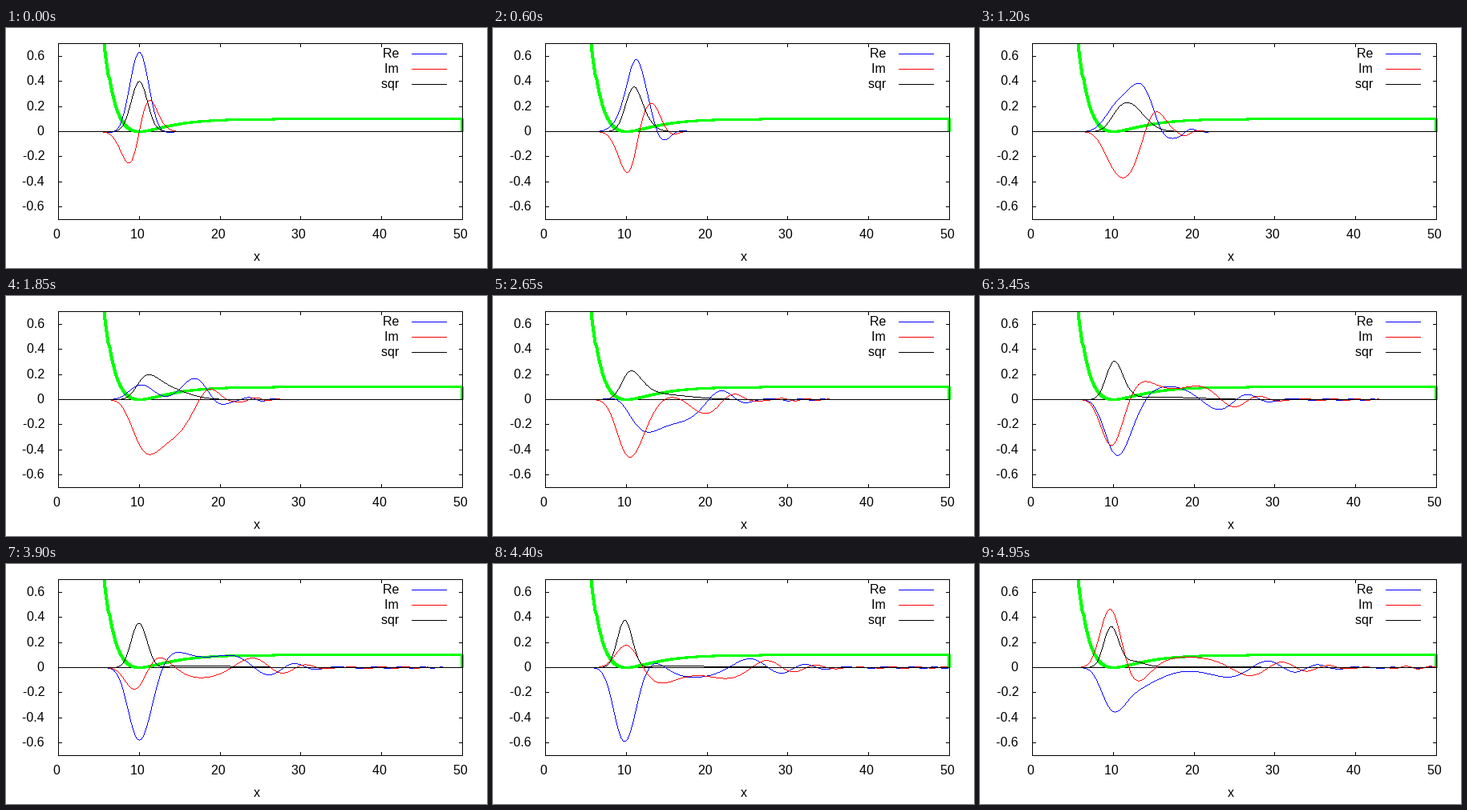
A matplotlib script for the animation above (5000 ms loop, 600 by 300 pixels).

```python
import numpy as np
import matplotlib
import matplotlib.pyplot as plt
from matplotlib.animation import FuncAnimation

matplotlib.rcParams["font.family"] = "Liberation Sans"
matplotlib.rcParams["path.simplify"] = False

W, H, DPI = 600, 300, 100
PT = 72 / DPI                                   # points per pixel
LEFT, RIGHT, TOP, BOTTOM = 65, 569, 19, 239     # plot box in pixels
X_MAX, Y_MAX = 50, 0.7
FRAMES, INTERVAL = 100, 50
STEP, FIRST = 0.2, 0.01     # time per picture, and the short first advance

# Morse well (drawn at a tenth of its depth) and a moving Gaussian packet
X0, WELL_A, K0, V_SCALE = 10, 0.3, 0.5, 0.1
x = np.linspace(0, X_MAX, 501)
dx = x[1] - x[0]
well = (1 - np.exp(-WELL_A * (x - X0))) ** 2
packet = (2 * np.pi) ** -0.25 * np.exp(-(x - X0) ** 2 / 4 + 1j * K0 * (x - X0))

# Schroedinger equation with hard walls, solved through its eigenstates
n = len(x) - 2
hop = np.full(n - 1, -0.5 / dx ** 2)
hamilton = np.diag(1 / dx ** 2 + well[1:-1]) + np.diag(hop, 1) + np.diag(hop, -1)
energy, states = np.linalg.eigh(hamilton)
weights = states.T @ packet[1:-1]


def wave(t):
    psi = np.zeros(len(x), complex)
    psi[1:-1] = states @ (weights * np.exp(-1j * energy * t))
    return psi


# Pixel centres for data values
def px(v):
    return np.floor(LEFT + np.asarray(v) * (RIGHT - LEFT) / X_MAX + 0.5) + 0.5


def py(v):
    mid = (TOP + BOTTOM) / 2
    return np.floor(mid - np.asarray(v) * (BOTTOM - TOP) / (2 * Y_MAX) + 0.5) + 0.5


fig = plt.figure(figsize=(W / DPI, H / DPI), dpi=DPI, facecolor="white")
ax = fig.add_axes([0, 0, 1, 1])
ax.set_xlim(0, W)
ax.set_ylim(H, 0)
ax.axis("off")


def line(xs, ys, color="black", width=1, z=2, cap="projecting"):
    return ax.plot(xs, ys, color=color, lw=width * PT, antialiased=False,
                   snap=False, solid_capstyle=cap, zorder=z)[0]


def label(x_pos, y_pos, text, align):
    # the trailing space keeps glyphs on their full pixel spacing
    ax.text(x_pos, y_pos, text + " ", fontsize=16 * PT, ha=align, va="baseline")


# Hairline curves: one upright bar of whole pixels per column
cols = np.arange(LEFT, RIGHT + 1)
col_x = (cols - LEFT) * X_MAX / (RIGHT - LEFT)
bar_x = np.repeat(cols + 0.5, 3)


def bars(values):
    y = py(np.interp(col_x, x, values)) - 0.5
    joint = (y[:-1] + y[1:]) / 2 + 0.25
    ends = np.array([y, np.r_[y[0], joint], np.r_[joint, y[-1]]])
    top = np.ceil(ends.min(axis=0))
    bottom = np.floor(ends.max(axis=0)) + 1
    return np.column_stack([top, bottom, np.full(len(y), np.nan)]).ravel()


# Frame, ticks and their labels
l, r, t, b = (v + 0.5 for v in (LEFT, RIGHT, TOP, BOTTOM))
line([l, r, r, l, l], [t, t, b, b, t], z=6)
TICK = 4
for v in range(0, X_MAX + 1, 10):
    p = px(v)
    line([p, p], [b, b - TICK], z=6)
    line([p, p], [t, t + TICK], z=6)
    label(p, 263, str(v), "center")
for i in range(-3, 4):
    p = py(i * 0.2)
    line([l, l + TICK], [p, p], z=6)
    line([r, r - TICK], [p, p], z=6)
    label(52.6, p + 4.5, f"{i * 0.2:.1f}" if i else "0", "right")
label(315, 291, "x", "center")
line([l, r], [py(0), py(0)], z=1)

# Potential, starting where it enters the box and dropping at the wall
shown = V_SCALE * well
enter = X0 - np.log(1 + np.sqrt(Y_MAX / V_SCALE)) / WELL_A
inside = x > enter
shown[-1] = 0
line(px(np.r_[enter, x[inside]]), py(np.r_[Y_MAX, shown[inside]]),
     "#00ff00", 3, z=2, cap="butt")

# Curves and key
curves = []
for i, (name, color) in enumerate([("Re", "#0000ff"), ("Im", "#ff0000"),
                                   ("sqr", "black")]):
    y_key = 32.5 + 19 * i
    label(494.75, y_key + 4.5, name, "right")
    line([506.5, 549.5], [y_key, y_key], color)
    curves.append(line(bar_x, bars(0 * x), color, z=3 + i, cap="butt"))


def update(frame):
    psi = wave(FIRST + (frame - 1) * STEP if frame else 0)
    for curve, values in zip(curves, (psi.real, psi.imag, abs(psi) ** 2)):
        curve.set_ydata(bars(values))
    return curves


anim = FuncAnimation(fig, update, frames=FRAMES, interval=INTERVAL,
                     init_func=lambda: update(0), repeat=True, blit=False)
plt.show()
```
